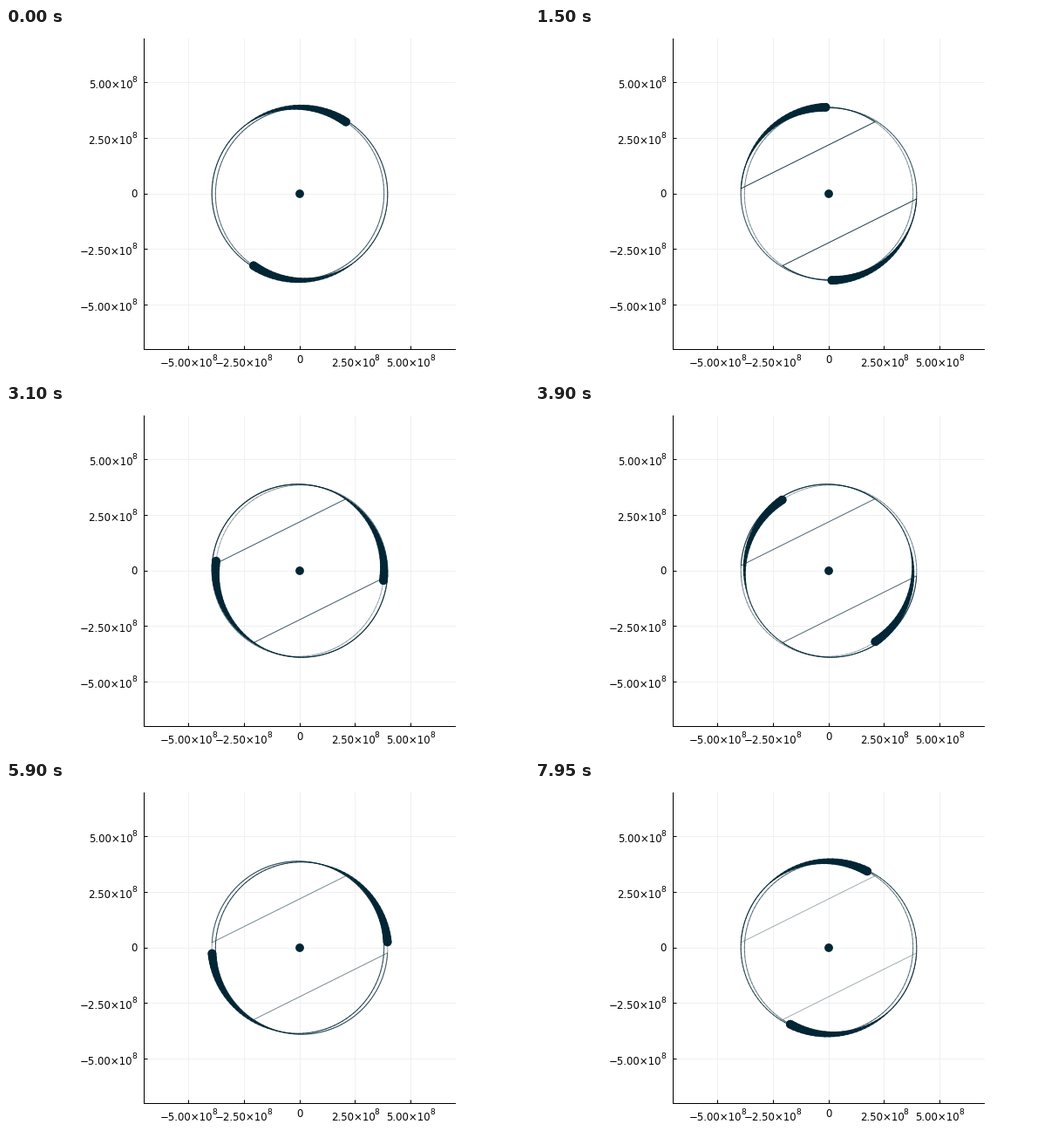
A matplotlib script that plays this animation: 600x400 px, repeating every 8 s.

```python
import numpy as np
import matplotlib.pyplot as plt
from matplotlib.animation import FuncAnimation
from matplotlib.collections import LineCollection
from matplotlib.colors import to_rgb
from matplotlib.patches import Circle

W, H, DPI = 600, 400, 100
PX = 72 / DPI                      # points per pixel
FRAMES, INTERVAL = 160, 50
CX, CY, UNIT = 337.0, 190.0, 63.7  # origin and tick spacing in pixels
LEFT, RIGHT, TOP, BOTTOM = 158.5, 516, 12, 368.5
AXIS, ECC = 98.75, 0.0215          # orbit semi-major axis and eccentricity
FAR = np.radians(12)               # direction of the far point
RATE = 3.013                       # mean motion, degrees per frame
RESTART = 125.0                    # phase reached just before the jump
TRAIL = 250
INK = "#002635"

fig = plt.figure(figsize=(W / DPI, H / DPI), dpi=DPI, facecolor="white")
ax = fig.add_axes([0, 0, 1, 1])
ax.set_xlim(0, W)
ax.set_ylim(H, 0)
ax.axis("off")


def line(xs, ys, color="black", z=1):
    ax.plot(xs, ys, color=color, lw=PX, zorder=z, solid_capstyle="butt",
            snap=False)


def label(x, y, text, size=11.7, ha="right"):
    ax.text(x, y, text, fontsize=size * PX, ha=ha, va="baseline",
            family="DejaVu Sans", color="black")


def power_label(right, base, value):
    label(right, base, f"{value:.2f}×10".replace("-", "−"))
    label(right - 1, base - 7, "8", 9.2, "left")


for i in range(-2, 3):
    x, y = CX + i * UNIT, CY - i * UNIT
    gx, gy = np.floor(x) + 0.5, np.floor(y) + 0.5
    line([gx, gx], [TOP, BOTTOM], "#f0f0f0", 0)
    line([LEFT, RIGHT], [gy, gy], "#f0f0f0", 0)
    line([gx, gx], [BOTTOM - 4, BOTTOM])
    line([LEFT, LEFT + 4], [gy, gy])
    if i == 0:
        label(x, 384.5, "0", ha="center")
        label(150.3, y + 4.5, "0")
    else:
        power_label(x + (22.8 if i > 0 else 27.3), 388, 2.5 * i)
        power_label(145.3, y + 6.4, 2.5 * i)

line([LEFT, LEFT], [TOP, BOTTOM + 0.5])
line([LEFT - 0.5, RIGHT], [BOTTOM, BOTTOM])


def orbit(k):
    """Offsets from the centre at steps k, clockwise from the left."""
    phase = np.radians(RATE * k + np.where(k <= 0, RESTART, 0)) - FAR
    turn = phase - 2 * ECC * np.sin(phase)
    r = AXIS * (1 - ECC ** 2) / (1 - ECC * np.cos(turn))
    angle = turn + FAR
    return np.column_stack([-r * np.cos(angle), -r * np.sin(angle)])


age = np.arange(TRAIL - 1, -1, -1) + 0.5
widths = np.maximum(10 - 0.385 * age, 1) * PX
colors = np.column_stack([np.tile(to_rgb(INK), (TRAIL, 1)),
                          np.clip(1 - age / TRAIL, 0, 1)])

trails = [LineCollection([], linewidths=widths, colors=colors,
                         capstyle="round", zorder=3) for _ in range(2)]
for trail in trails:
    ax.add_collection(trail, autolim=False)
dots = [ax.add_patch(Circle((CX, CY), 4.9, color=INK, lw=0, zorder=4))
        for _ in range(3)]


def update(frame):
    path = orbit(np.arange(frame - TRAIL, frame + 1))
    for trail, dot, sign in zip(trails, dots, (1, -1)):
        pts = np.array([CX, CY]) + sign * path
        trail.set_segments(np.stack([pts[:-1], pts[1:]], axis=1))
        dot.set_center(pts[-1])
    return [*trails, *dots]


anim = FuncAnimation(fig, update, frames=FRAMES, interval=INTERVAL,
                     repeat=True, repeat_delay=0, blit=False)
plt.show()
```
